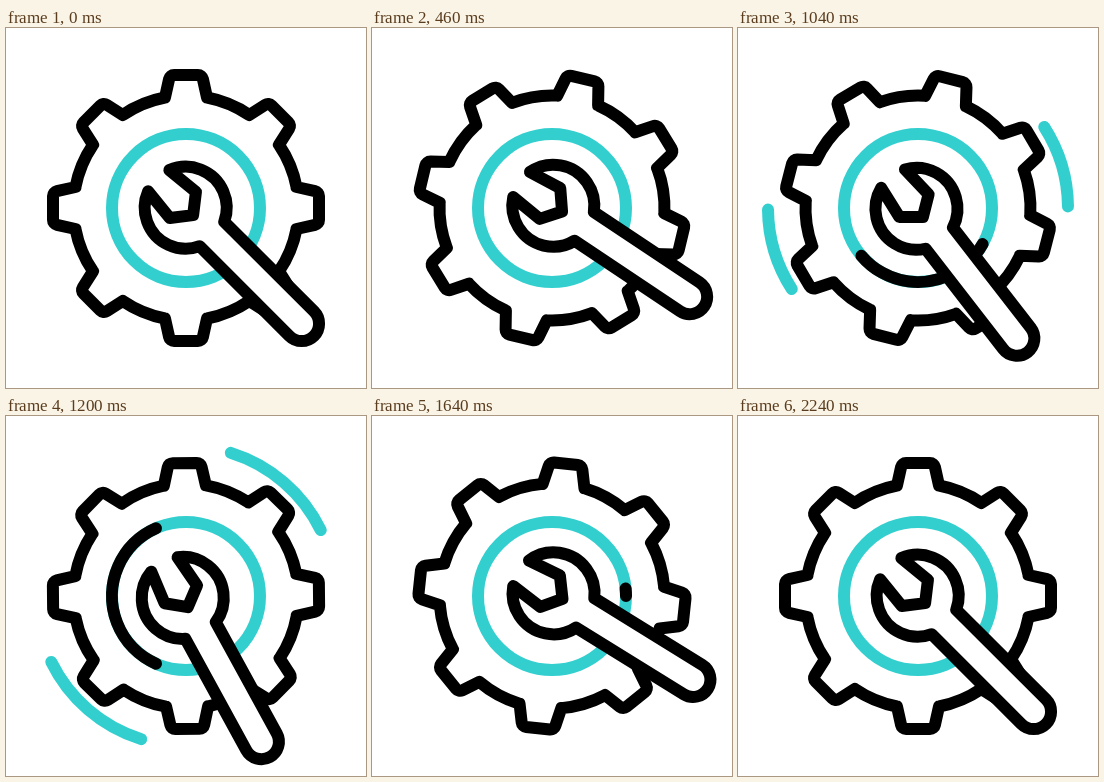
An HTML page with a canvas that plays this animation: 360 px wide and 360 px high, repeating every 2.4 s.

```html
<!DOCTYPE html>
<html lang="en">
<head>
<meta charset="utf-8">
<title>Gear and wrench</title>
<style>
html, body { margin: 0; width: 100%; height: 100%; overflow: hidden; background: #fff; }
canvas { display: block; width: 360px; height: 360px; }
</style>
</head>
<body>
<canvas id="stage" width="360" height="360"></canvas>
<script>
const ctx = document.getElementById('stage').getContext('2d');
const LOOP = 2400, STEP = 20, DEG = Math.PI / 180;
const BLACK = '#000', TEAL = '#33cfcf';

// Eased progress from 0 to 1 between two times
function ease(t, from, to) {
  const s = Math.min(1, Math.max(0, (t - from) / (to - from)));
  return s * s * (3 - 2 * s);
}

// Eased value through [time, value] keys
function track(t, keys) {
  let value = keys[0][1];
  for (let i = 1; i < keys.length; i++)
    value += (keys[i][1] - keys[i - 1][1]) * ease(t, keys[i - 1][0], keys[i][0]);
  return value;
}

function arc(r, from, to, color) {
  ctx.beginPath();
  ctx.arc(0, 0, r, from * DEG, to * DEG);
  ctx.strokeStyle = color;
  ctx.stroke();
}

function gear(angle) {
  ctx.save();
  ctx.rotate(angle * DEG);
  ctx.beginPath();
  for (let i = 0; i < 8; i++) {
    ctx.lineTo(-21, -110.5);
    ctx.arcTo(-16, -133, 0, -133, 5);
    ctx.arcTo(16, -133, 21, -110.5, 5);
    ctx.lineTo(21, -110.5);
    ctx.arc(0, 0, 112.5, -79.2 * DEG, -55.8 * DEG);
    ctx.rotate(45 * DEG);
  }
  ctx.closePath();
  ctx.strokeStyle = BLACK;
  ctx.stroke();
  ctx.restore();
}

function wrench(angle) {
  const neck = 25 * DEG, tip = 158.5 * DEG;
  ctx.save();
  // The pivot lies in the jaw, a little behind the middle of the head
  ctx.translate(-9.5, -9.5);
  ctx.rotate(angle * DEG);
  ctx.translate(13, 0);
  ctx.beginPath();
  ctx.arc(0, 0, 41, -tip, -neck);
  ctx.arc(164, 0, 17.4, -90 * DEG, 90 * DEG);
  ctx.arc(0, 0, 41, neck, tip);
  ctx.lineTo(-4, 18.5);
  ctx.lineTo(10.5, 0);
  ctx.lineTo(-4, -18.5);
  ctx.closePath();
  ctx.fillStyle = '#fff';
  ctx.fill();
  ctx.strokeStyle = BLACK;
  ctx.stroke();
  ctx.restore();
}

function draw(t) {
  ctx.setTransform(1, 0, 0, 1, 0, 0);
  ctx.fillStyle = '#fff';
  ctx.fillRect(0, 0, 360, 360);
  ctx.translate(180, 180);
  ctx.lineWidth = 12;
  ctx.lineCap = ctx.lineJoin = 'round';

  gear(360 * (ease(t, 198, 1224) + ease(t, 1335, 2235)));

  arc(74, 0, 360, TEAL);
  const head = 360 * ease(t, 700, 1500), tail = 360 * ease(t, 900, 1700);
  if (head > tail) arc(74, tail, head, BLACK);

  const lead = 90 * ease(t, 830, 1345), trail = 90 * ease(t, 1015, 1535);
  if (lead > trail)
    for (const side of [0, 180]) arc(150, side - lead, side - trail, TEAL);

  wrench(track(t, [[200, 45], [700, 23.7], [1200, 61.3], [1700, 30.5], [2240, 45]]));
}

const start = performance.now();
function frame() {
  const t = (performance.now() - start) % LOOP;
  draw(Math.floor(t / STEP) * STEP);
  requestAnimationFrame(frame);
}
frame();
</script>
</body>
</html>
```
